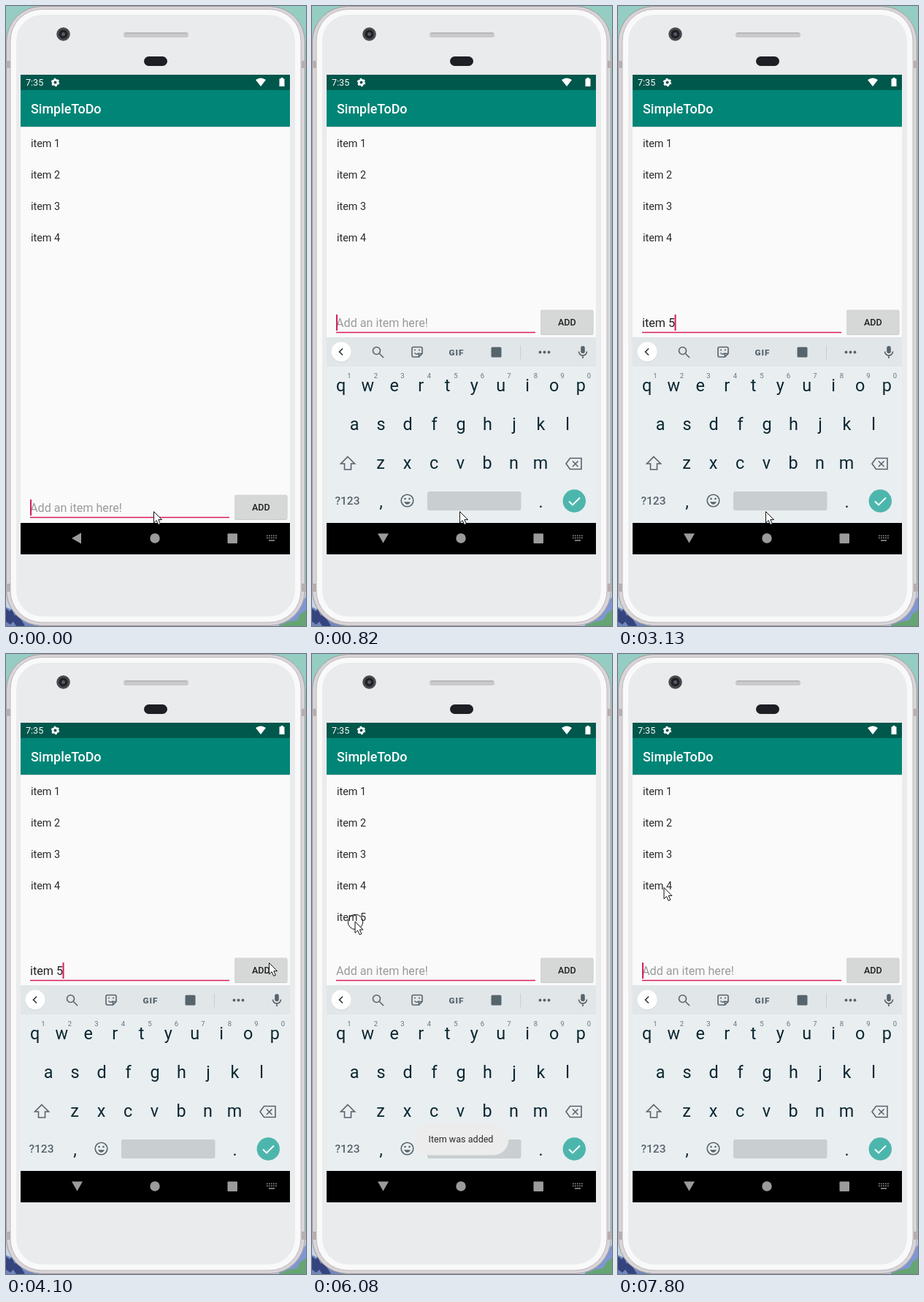
Recreate the animation shown at these times as an HTML page. Size 411 px wide and 848 px high, loop 8 s.

```html
<!DOCTYPE html>
<html lang="en">
<head>
<meta charset="utf-8">
<title>SimpleToDo</title>
<style>
  html, body { margin: 0; width: 100%; height: 100%; overflow: hidden; background: #96cdc3; }
  svg { display: block; width: 100%; height: 100%; font-family: Roboto, sans-serif; }
  text { white-space: pre; }
  .list { font-size: 14.37px; fill: #2a2a2a; }
  .field { font-size: 16.16px; fill: #212121; }
  .key { font-size: 23.4px; fill: #0b2731; text-anchor: middle; }
  .digit { font-size: 9.5px; fill: #66757c; text-anchor: middle; }
  .word { font-size: 16.16px; fill: #667278; text-anchor: middle; }
  .line { fill: none; stroke: #56646b; stroke-width: 1.6; }
  .solid { fill: #56646b; }
</style>
</head>
<body>
<svg viewBox="0 0 411 848">
  <defs>
    <clipPath id="screen"><rect x="20" y="94" width="369" height="613"/></clipPath>
  </defs>

  <!-- Backdrop -->
  <rect width="411" height="848" fill="#96cdc3"/>
  <path d="M0 795H411V848H0Z" fill="#c3d3e4"/>
  <path d="M0 822l6 3 5-3 7 7 6-2 8 9 14 12H0Z" fill="#6f88bb"/>
  <path d="M0 824l5 4 3-3 4 9 5-4 3 8 6 10H14l-4-6-4 4-6-4Z" fill="#35447f"/>
  <path d="M411 808l-8 10-10 6-20 24h38Z" fill="#7f97d2"/>
  <path d="M411 826l-8 6-4 8-12 2-14 6h38Z" fill="#67a474"/>

  <!-- Phone body -->
  <rect x="289" y="0" width="10" height="4" fill="#918b8e"/>
  <rect x=".5" y=".5" width="409" height="847" rx="48" fill="#d8d4d7" stroke="#a29c9f"/>
  <rect x="6" y="4.500" width="398" height="838.500" rx="43" fill="#f9f9fa" stroke="#bfbabd"/>
  <rect x="14" y="12" width="382" height="823" rx="36" fill="#e9ebec"/>
  <path d="M0 75h6v10h-6ZM405 75h6v10h-6ZM0 790h6v11h-6ZM405 790h6v11h-6Z" fill="#b5afb2"/>
  <circle cx="78.500" cy="38.500" r="9.300" fill="#4a4a4c"/>
  <circle cx="78.500" cy="38.500" r="6" fill="#202127"/>
  <circle cx="78.500" cy="38.500" r="2.500" fill="#535a66"/>
  <rect x="161" y="36" width="89" height="7" rx="3" fill="#c9c9cb"/>
  <path d="M163 37h85" stroke="#aaaaac"/>
  <rect x="189" y="69" width="32" height="13" rx="6.500" fill="#1e1e25"/>

  <!-- App -->
  <rect x="20" y="94" width="369" height="656" fill="#fafafa"/>
  <rect x="20" y="94" width="369" height="21.500" fill="#00574b"/>
  <rect x="20" y="115" width="369" height="50" fill="#008577"/>
  <rect x="20" y="165" width="369" height="1" fill="#d3dddc"/>
  <text x="27" y="109" font-size="12.57" fill="#fff">7:35</text>
  <circle cx="67.500" cy="104.500" r="3.300" fill="none" stroke="#fff" stroke-width="2.600"/>
  <circle cx="67.500" cy="104.500" r="4.700" fill="none" stroke="#fff" stroke-width="2" stroke-dasharray="2.700 2.222"/>
  <path d="M342 101q7-5 14 0l-7 9Z" fill="#fff"/>
  <path d="M374.500 99.500h2v-1.500h3v1.500h2v10.500h-7Z" fill="#fff"/>
  <text x="34" y="147" font-size="17.96" font-weight="500" fill="#fff">SimpleToDo</text>
  <g id="items"></g>

  <g id="inputRow">
    <text id="field" class="field" x="33" y="439"></text>
    <path id="composing" stroke="#333" stroke-width="1"/>
    <path d="M33 446.500H306" stroke="#d81b60" stroke-width="1.600"/>
    <rect id="caret" y="422" width="2" height="22" fill="#d81b60"/>
    <rect x="313" y="416.500" width="72.500" height="33.500" rx="2" fill="#c9caca"/>
    <rect id="button" x="313" y="415.500" width="72.500" height="33.500" rx="2"/>
    <text x="349.300" y="437" font-size="12.57" font-weight="500" text-anchor="middle" fill="#212121">ADD</text>
  </g>

  <!-- Keyboard -->
  <g clip-path="url(#screen)">
  <g id="keyboard">
    <rect x="20" y="453" width="369" height="254" fill="#e9eef1"/>
    <rect x="20" y="453" width="369" height="40" fill="#e1e6e9"/>
    <circle cx="40" cy="474" r="13.500" fill="#cbd1d4"/>
    <circle cx="40" cy="473" r="13.500" fill="#fff"/>
    <path id="chevron" fill="none" stroke="#33393c" stroke-width="1.700"/>
    <g id="toolbar">
      <path class="line" d="M92.500 475.500L98 481"/><circle class="line" cx="88.500" cy="471.500" r="5"/>
      <path class="line" d="M139 466.500h10q2 0 2 2v7l-4.500 4.500h-7.500q-2 0-2-2v-9.500q0-2 2-2ZM146.500 480v-4.500h4.500M140.500 474.500q3.500 3.500 6 0"/>
      <path class="line" d="M140 470.500h2M146 470.500h2"/>
      <text x="198" y="477.500" font-size="11.8" font-weight="900" letter-spacing="1" text-anchor="middle" class="solid">GIF</text>
      <rect class="solid" x="245.500" y="466.500" width="14" height="14" rx="1.500"/>
      <path d="M285.500 464v19" stroke="#c6cdd1"/>
      <circle class="solid" cx="312.500" cy="473.500" r="1.900"/><circle class="solid" cx="318.500" cy="473.500" r="1.900"/><circle class="solid" cx="324.500" cy="473.500" r="1.900"/>
    </g>
    <g id="suggestions">
      <path d="M149.500 462v22M257.500 462v22" stroke="#c0c8cc"/>
      <text class="word" x="101" y="479.500"></text>
      <text class="word" x="203" y="479.500"></text>
      <text class="word" x="305" y="479.500"></text>
    </g>
    <rect class="solid" x="368.200" y="465" width="5.600" height="10" rx="2.800"/>
    <path class="line" d="M365.500 472.500a5.500 5.500 0 0 0 11 0M371 478v4"/>
    <g id="keys"></g>
    <path class="line" d="M49 616.500l9.500 9.500h-5v8h-9v-8h-5Z"/>
    <path class="line" d="M353.500 618.500h15.500v15h-15.500l-5.500-7.500ZM357 622.500l7.500 7.500M364.500 622.500l-7.500 7.500"/>
    <text x="48.500" y="682" font-size="15.5" font-weight="500" text-anchor="middle" class="solid">?123</text>
    <circle class="line" cx="130.500" cy="676.500" r="8.300"/>
    <circle class="solid" cx="127.500" cy="674" r="1.300"/><circle class="solid" cx="133.500" cy="674" r="1.300"/>
    <path class="solid" d="M125.800 678.300h9.400q-4.700 7-9.400 0Z"/>
    <rect x="158" y="664" width="128.500" height="26" rx="3" fill="#c9ced1"/>
    <circle cx="359.300" cy="677" r="15.700" fill="#4db6ac"/>
    <path d="M352 677.500l5 5 10-10" fill="none" stroke="#fff" stroke-width="1.900"/>
  </g>
  </g>

  <g id="toast">
    <rect id="bubble" y="642.500" height="43" rx="21.500" fill="#ececec"/>
    <text id="message" x="204" y="668" font-size="12.57" text-anchor="middle" fill="#2b2b2b"></text>
  </g>

  <!-- Navigation bar -->
  <rect x="20" y="707" width="369" height="43" fill="#000"/>
  <path id="back" fill="#9b9b9b"/>
  <circle cx="204" cy="728" r="6.700" fill="#9b9b9b"/>
  <rect x="303.500" y="721.500" width="13.500" height="13.500" rx="1" fill="#9b9b9b"/>
  <path d="M357 724.500h14M357 727.500h14" stroke="#8a8a8a" stroke-width="1.700" stroke-dasharray="1.800 1.200"/>
  <path d="M360 731h8" stroke="#8a8a8a" stroke-width="1.700"/>

  <g id="pointer">
    <circle id="ring" cx="1" cy="1" r="10.200" fill="none" stroke="#111"/>
    <path d="M.5.5V16l3.600-3.400 2.600 5.800 2.700-1.200-2.600-5.600H11.500Z" fill="#fff" stroke="#111"/>
  </g>
</svg>

<script>
const LOOP = 8000;
const $ = id => document.getElementById(id);
const set = (id, attrs) => Object.entries(attrs).forEach(([k, v]) => $(id).setAttribute(k, v));
const pen = document.createElement('canvas').getContext('2d');
const textWidth = (text, size) => {
  pen.font = `${size}px Roboto, sans-serif`;
  return pen.measureText(text).width;
};

// Each track holds [start, ...values]; a value lasts until the next start.
const tracks = {
  typed: [[0, ''], [1380, 'i'], [1620, 'it'], [1890, 'ite'], [2170, 'item'], [2320, 'item '], [3010, 'item 5'], [4640, '']],
  words: [[0, ''], [1500, 'I', 'in', 'is'], [1620, 'it', "it's", 'its'], [1890, 'ite', 'item', 'items'],
    [2170, 'item', 'item is', 'items'], [2320, 'is', 'and', 'in'], [3130, '']],
  caret: [[0, 1], [420, 0], [820, 1], [2730, 0], [3010, 1], [3560, 0], [4100, 1], [5030, 0], [5420, 1],
    [5930, 0], [6450, 1], [6870, 0], [7410, 1]],
  keyboard: [[0, 0], [150, .75], [270, 1]],
  button: [[0, '#d6d7d7'], [4520, '#cccdcd'], [4790, '#dadbdb'], [5030, '#d6d7d7']],
  lastItem: [[0, 0], [4790, .72], [4910, 1], [6600, .4], [6750, 0]],
  toast: [[0, '', 0], [4790, 'Item was added', .4], [4910, 'Item was added', .6], [5030, 'Item was added', .8],
    [5150, 'Item was added', .92], [5270, 'Item was added', 1], [6600, 'Item was added', .5],
    [6750, 'Item was removed', .3], [6870, 'Item was removed', .6], [7020, 'Item was removed', .8],
    [7140, 'Item was removed', 1], [7680, 'Item was removed', .5], [7800, '', 0]],
  pointer: [[0, 202, 691], [3560, 204, 635], [3710, 270, 555], [3830, 356, 474], [3980, 379, 440], [4100, 360, 422],
    [4220, 340, 418], [4370, 357.5, 415], [4910, 270, 378], [5030, 150, 330], [5150, 86, 316], [5270, 75, 325],
    [5420, 68, 340], [5540, 61, 352], [5660, 58, 362], [5780, 58.5, 365.5], [7020, 60, 352], [7140, 61, 335], [7260, 62.5, 319]],
  ring: [[0, 0], [4370, 1], [4520, 0], [6080, 1], [6600, 0], [7680, 1], [7800, 0]]
};
const at = (name, t) => tracks[name].findLast(([start]) => start <= t).slice(1);

const label = (cls, x, y, text) => `<text class="${cls}" x="${x}" y="${y}">${text}</text>`;
const keyRow = (letters, x, y) => [...letters].map((c, i) => label('key', x + i * 36.5, y, c)).join('');
$('items').innerHTML = [1, 2, 3, 4, 5].map(n => label('list', 34, 149.5 + 43 * n, 'item ' + n)).join('');
$('keys').innerHTML = keyRow('qwertyuiop', 39.7, 527) + keyRow('asdfghjkl', 58, 580) + keyRow('zxcvbnm', 94, 633)
  + label('key', 94.5, 686, ',') + label('key', 313.5, 686, '.')
  + [...'1234567890'].map((d, i) => label('digit', 51 + i * 36.5, 509, d)).join('');

function draw(t) {
  const [shown] = at('keyboard', t);
  set('keyboard', { opacity: shown, transform: `translate(0 ${(1 - shown) * 60})` });
  set('inputRow', { transform: `translate(0 ${shown ? 0 : 253})` });
  set('back', { d: shown ? 'M90 721.500h15l-7.500 13Z' : 'M103 720.500v15l-13-7.500Z' });

  const [typed] = at('typed', t);
  const end = 33 + textWidth(typed, 16.16);
  const composing = typed && !typed.includes(' ');
  $('field').textContent = typed || 'Add an item here!';
  $('field').style.fill = typed ? '#212121' : '#9b9b9b';
  set('composing', { d: composing ? `M33 441.500H${end}` : '' });
  set('caret', { x: typed ? end - .5 : 33, opacity: at('caret', t)[0] });
  set('button', { fill: at('button', t)[0] });

  const words = at('words', t);
  const suggesting = words[0] !== '';
  set('toolbar', { opacity: suggesting ? 0 : 1 });
  set('suggestions', { opacity: suggesting ? 1 : 0 });
  document.querySelectorAll('.word').forEach((node, i) => node.textContent = words[i] || '');
  set('chevron', { d: suggesting ? 'M38 468.500l4.500 4.500-4.500 4.500' : 'M42 468.500l-4.500 4.500 4.500 4.500' });

  $('items').lastChild.setAttribute('opacity', at('lastItem', t)[0]);
  const [message, alpha] = at('toast', t);
  const width = textWidth(message, 12.57) + 41;
  $('message').textContent = message;
  set('bubble', { x: 204.5 - width / 2, width });
  set('toast', { opacity: alpha });

  set('pointer', { transform: `translate(${at('pointer', t).join(' ')})` });
  set('ring', { opacity: at('ring', t)[0] });
}

const start = performance.now();
function tick() {
  draw((performance.now() - start) % LOOP);
  requestAnimationFrame(tick);
}
tick();
</script>
</body>
</html>
```
